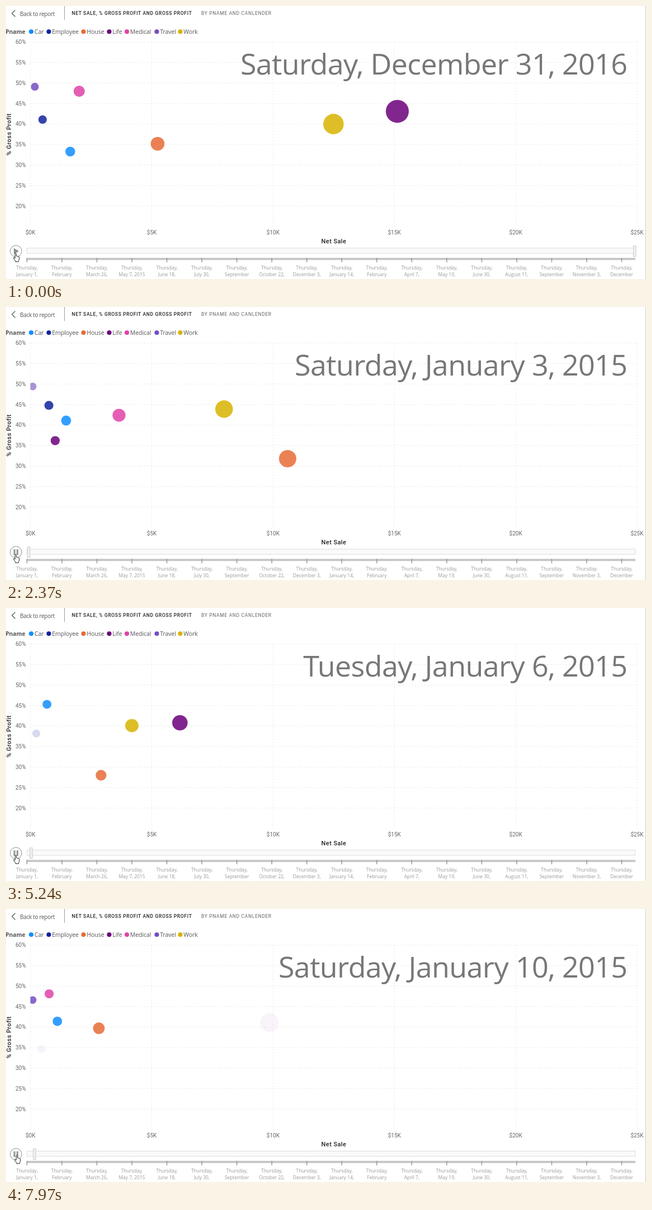
Animation of 1144 by 490 pixels, one loop 8 s. Source, as an HTML page:

```html
<!DOCTYPE html>
<html lang="en">
<head>
<meta charset="utf-8">
<title>Net sale bubbles</title>
<style>
html, body { margin: 0; width: 100%; height: 100%; overflow: hidden; background: #fff; }
svg { display: block; width: 1144px; height: 490px; }
.ui { font-family: "Open Sans", "Noto Sans", sans-serif; }
.num { font-family: Roboto, "Liberation Sans", sans-serif; }
.grid { stroke: #dedede; stroke-dasharray: 1.5 4; }
.date { font-size: 52px; letter-spacing: -.65px; fill: #777; }
.axis { font-size: 10px; fill: #666; }
.name { font-size: 11px; font-weight: 500; letter-spacing: .42px; fill: #252423; }
.head { font-size: 8.5px; letter-spacing: .66px; }
.key { font-size: 10.6px; letter-spacing: -.1px; fill: #555; }
.tick { font-size: 8.45px; fill: #999; }
</style>
</head>
<body>
<svg id="stage" viewBox="0 0 1144 490" xmlns="http://www.w3.org/2000/svg">
  <defs><clipPath id="plot"><rect x="43.5" y="60" width="1085" height="340"/></clipPath></defs>
</svg>
<script>
const LOOP = 8000, FIRST = 740, DAY = 760, WAIT = 170, MOVE = 230;
const stage = document.getElementById("stage");

function set(el, attrs) {
  for (const k in attrs) el.setAttribute(k, attrs[k]);
}
function add(tag, attrs, parent = stage) {
  const el = document.createElementNS("http://www.w3.org/2000/svg", tag);
  set(el, attrs);
  parent.appendChild(el);
  return el;
}
function text(str, x, y, cls, attrs = {}) {
  const el = add("text", { x, y, class: cls, ...attrs });
  el.textContent = str;
  return el;
}
const middle = { "text-anchor": "middle" }, end = { "text-anchor": "end" };
const clamp = k => Math.min(1, Math.max(0, k));
const lerp = (a, b, k) => a + (b - a) * k;
const ease = k => k < .5 ? 4 * k ** 3 : 1 - (2 - 2 * k) ** 3 / 2;

// Days are counted from January 1, 2015
const LAST = 730;
const format = (day, parts) => new Date(Date.UTC(2015, 0, 1 + day))
  .toLocaleDateString("en-US", { timeZone: "UTC", ...parts });
const monthDay = { month: "long", day: "numeric" };
const fullDate = { weekday: "long", year: "numeric", ...monthDay };

// Header
add("path", { d: "M16.5 7.5 L10.5 13.3 L16.5 19.2", fill: "none", stroke: "#555", "stroke-width": 1.2 });
text("Back to report", 25, 17.5, "ui", { "font-size": 10, "letter-spacing": "-.3", fill: "#555" });
add("path", { d: "M104.5 0 V25", stroke: "#999" });
add("path", { d: "M1143.5 0 V490", stroke: "#ccc" });
text("NET SALE, % GROSS PROFIT AND GROSS PROFIT", 117.5, 16, "num head", { "font-weight": 500, fill: "#252423" });
text("BY PNAME AND CANLENDER", 349, 16, "num head", { fill: "#666" });

// Key points per product: [sale in $K, margin in %, opacity], null when there is no sale
const keyDays = [0, 1, 2, 4, 6, 7.33, 10];
const series = [
  { name: "Car", fill: "#118dff", x: 45,
    keys: [[1.64, 33.3], [2.82, 37.7], [1.47, 41.1], [1.3, 34.3], [.68, 45.3], [1.13, 42.6], [1.11, 41.4]] },
  { name: "Employee", fill: "#12239e", x: 76.5,
    keys: [[.5, 41.1], [.61, 40.3], [.76, 44.8], [.33, 46.3], [.24, 38.2, .2], [1, 41.2], [.45, 34.7, .05]] },
  { name: "House", fill: "#e66c37", x: 138.5,
    keys: [[5.24, 35.2], [5.34, 32.6], [10.6, 31.8], [5.15, 40.3], [2.91, 28], [2.88, 40.9], [2.82, 39.7]] },
  { name: "Life", fill: "#6b007b", x: 184.5,
    keys: [[15.12, 43.1], [3.94, 37.5], [1.02, 36.2], [2.11, 35.6], [6.16, 40.8], [1.16, 31.8], [9.85, 41.1, .05]] },
  { name: "Medical", fill: "#e044a7", x: 216,
    keys: [[2.01, 48], [1.76, 37.8], [3.65, 42.4], [3.63, 42.2], null, [3.14, 47.2], [.77, 48.1]] },
  { name: "Travel", fill: "#744ec2", x: 269.5,
    keys: [[.18, 49.1], [.08, 43.1], [.09, 49.4, .72], null, null, [.1, 51.7], [.09, 46.6]] },
  { name: "Work", fill: "#d9b300", x: 311.5,
    keys: [[12.49, 40], [6.41, 46.4], [7.98, 43.9], [4.84, 48.1], [4.18, 40.1], [8.49, 43], null] }
];

// A missing product stays where it was, unseen
for (const s of series) {
  s.keys.forEach((key, i) => {
    if (!key) s.keys[i] = [...s.keys[i - 1].slice(0, 2), 0];
  });
}

// Legend
text("Pname", -1, 50, "ui", { "font-size": 10.3, "font-weight": 700, fill: "#555" });
for (const { name, fill, x } of series) {
  add("circle", { cx: x, cy: 46, r: 4.1, fill });
  text(name, x + 5.8, 50, "ui key");
}

// Axes
const px = sale => 43.7 + sale * 43.37;
const py = margin => 64.7 + (60 - margin) * 7.36;
for (let m = 60; m >= 20; m -= 5) {
  add("path", { d: `M${px(0)} ${py(m)} H1128`, class: "grid" });
  text(m + "%", 35.5, py(m) + 3.5, "num axis", end);
}
for (let s = 0; s <= 25; s += 5) {
  add("path", { d: `M${px(s)} ${py(60)} V396`, class: "grid" });
  text(`$${s}K`, px(s), 410, "num axis", middle);
}
text("Net Sale", 586, 425.5, "num name", middle);
text("% Gross Profit", 0, 0, "num name", { ...middle, transform: "translate(9 230.5) rotate(-90)" });

const date = text("", 1110.3, 122.6, "ui date", end);

// Time axis: one tick every six weeks, with as much of the date as fits
add("rect", { x: 37.5, y: 434.5, width: 1087, height: 9.5, fill: "#fafafa", stroke: "#ddd" });
const thumb = add("rect", { y: 430.5, width: 4.5, height: 19, fill: "#f0f0f0", stroke: "#ccc" });
add("rect", { x: 37, y: 452, width: 1088, height: 4, fill: "#c8c8c8" });
for (let day = 0; day < LAST; day += 42) {
  const x = 37.4 + day * 1.489;
  const short = format(day, monthDay) + ",";
  const label = [format(day, { year: "numeric", ...monthDay }), short, format(day, { month: "long" })]
    .find(s => s.length <= 11);
  add("path", { d: `M${x} 452 V460`, stroke: "#999", "stroke-width": 1.5 });
  text("Thursday,", x, 473.3, "ui tick", middle);
  text(label, x, 485.3, "ui tick", middle);
}

// Bubbles
const layer = add("g", { "clip-path": "url(#plot)" });
for (const s of series) s.dot = add("circle", { fill: s.fill }, layer);

// Button and pointer
const ring = add("circle", { cx: 17.8, cy: 440, r: 10.3, fill: "#fff" });
const play = add("path", { d: "M14 434.5 L22.8 440 L14 445.5 Z" });
const pause = add("path", { d: "M13.5 435h3.2v10h-3.2z M18.8 435h3.2v10h-3.2z", fill: "#999" });
const hand = add("path", {
  d: "M16.2 452 V445.2 q0-1.3 1.1-1.3 t1.1 1.3 V449 q.9-.7 1.8.3 q1-.5 1.7.4 q1.4-.3 1.7 1 V454 q0 2-1.2 3.4 V459 H16.8 V457.6 L13.6 453 q-.5-1.2.5-1.5 q.9-.1 2.1 1.3 Z",
  fill: "#fff", stroke: "#222", "stroke-linejoin": "round"
});

function place({ dot, keys }, day) {
  let i = 0;
  while (i < keys.length - 2 && day >= keyDays[i + 1]) i++;
  const k = clamp((day - keyDays[i]) / (keyDays[i + 1] - keyDays[i]));
  const [s0, m0, a0 = 1] = keys[i], [s1, m1, a1 = 1] = keys[i + 1];
  const sale = lerp(s0, s1, k), margin = lerp(m0, m1, k);
  // Area grows with gross profit
  const r = Math.sqrt(45 + .58 * sale * margin);
  set(dot, { cx: px(sale), cy: py(margin), r, opacity: lerp(a0, a1, k) * .85 });
}

function draw(t) {
  const n = Math.floor((t - FIRST) / DAY);
  const shown = n < 0 ? LAST : n;
  const label = format(shown, fullDate);
  if (date.textContent !== label) date.textContent = label;
  set(thumb, { x: 35.3 + shown * 1.488 });

  // Bubbles set off shortly after the date changes
  const phase = t - FIRST - n * DAY;
  const day = n < 0 ? 0 : n + ease(clamp((phase - WAIT) / MOVE));
  for (const s of series) place(s, day);

  const tone = t >= 420 && t < 580 ? "#666" : "#8c8c8c";
  set(ring, { stroke: tone });
  set(play, { fill: tone, visibility: t < 580 ? "visible" : "hidden" });
  set(pause, { visibility: t < 580 ? "hidden" : "visible" });

  const drift = 2 * clamp((t - 5010) / 2960);
  set(hand, { transform: `translate(${drift} ${-drift})` });
}

function tick() {
  draw(performance.now() % LOOP);
  requestAnimationFrame(tick);
}
tick();
</script>
</body>
</html>
```
